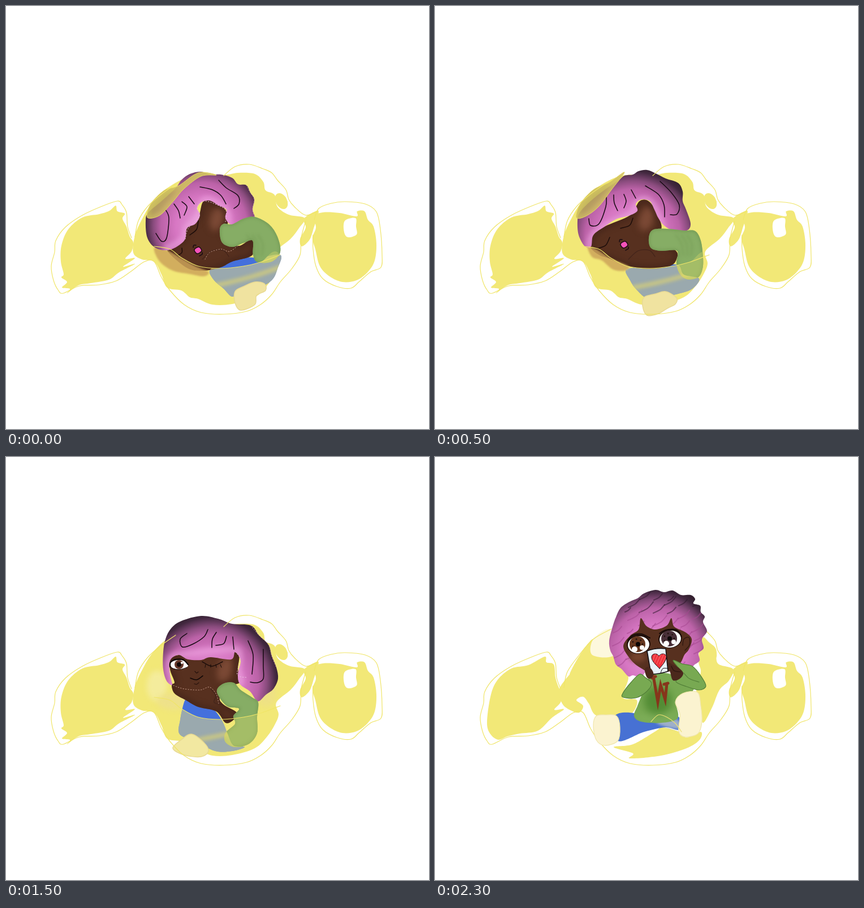
Recreate the animation shown at these times as an HTML page with a canvas. Size 748 by 748 pixels, loop 2.5 s.

```html
<!DOCTYPE html>
<html>
<head>
<meta charset="utf-8">
<style>
html, body { margin: 0; height: 100%; overflow: hidden; background: #fff }
canvas { display: block }
</style>
</head>
<body>
<canvas id="stage" width="748" height="748"></canvas>
<script>
const c = document.getElementById('stage').getContext('2d');
const YELLOW = '#f2e877', BROWN = '#57301f', CREAM = '#fbf3d0';

// Smooth path through "x,y x,y ..." points
function curve(text, closed = true) {
  const p = text.trim().split(/\s+/).map(s => s.split(',').map(Number));
  const n = p.length, path = new Path2D();
  const at = i => closed ? p[(i + n) % n] : p[Math.max(0, Math.min(n - 1, i))];
  path.moveTo(...p[0]);
  for (let i = 0; i < (closed ? n : n - 1); i++) {
    const [a, b, d, e] = [at(i - 1), at(i), at(i + 1), at(i + 2)];
    path.bezierCurveTo(b[0] + (d[0] - a[0]) / 6, b[1] + (d[1] - a[1]) / 6,
      d[0] - (e[0] - b[0]) / 6, d[1] - (e[1] - b[1]) / 6, ...d);
  }
  if (closed) path.closePath();
  return path;
}
function fill(shape, color) {
  c.fillStyle = color;
  c.fill(typeof shape === 'string' ? curve(shape) : shape);
}
function line(text, color = '#160a12', width = 1.5, closed = false) {
  c.strokeStyle = color;
  c.lineWidth = width;
  c.stroke(curve(text, closed));
}
function oval(x, y, rx, ry, color, turn = 0) {
  c.beginPath();
  c.ellipse(x, y, rx, ry, turn, 0, 7);
  c.fillStyle = color;
  c.fill();
}
function inside(shape, draw) {
  c.save();
  c.clip(curve(shape));
  draw();
  c.restore();
}
function soft(radius, draw) {
  c.save();
  c.filter = `blur(${radius}px)`;
  draw();
  c.restore();
}
function glow(x, y, r, stops) {
  const g = c.createRadialGradient(x, y, 0, x, y, r);
  stops.forEach(([at, color]) => g.addColorStop(at, color));
  return g;
}
const hairTone = (x, y, r) => glow(x, y, r, [[0, '#e6a0da'], [.45, '#d777c3'], [.68, '#bb62a7'], [.8, '#894b7d'], [.93, '#42283f'], [1, '#33202f']]);

const LEFT_WING = '98,424 110,395 135,374 165,368 183,362 194,353 197,363 210,367 206,376 213,390 219,408 225,418 222,434 211,447 228,446 207,461 228,456 200,471 182,484 150,490 128,494 108,508 113,500 99,498 108,488 98,480 102,474 97,452';
const LEFT_WING_FULL = '92,470 98,424 110,395 135,374 165,368 194,353 197,363 210,367 213,390 219,408 225,418 222,434 211,447 228,446 207,461 182,484 150,489 128,494 112,500 98,490';
const RIGHT_WING = '545,372 560,365 590,366 620,372 621,363 634,363 640,378 650,390 655,420 652,450 640,470 620,485 595,488 572,478 555,460 547,430 542,410 548,392';
const BODY = '228,406 240,378 258,348 285,322 330,300 385,299 410,295 440,297 455,311 459,326 475,334 480,355 500,369 528,375 518,393 503,412 478,434 482,455 476,472 462,494 440,515 400,527 365,528 340,518 325,515 310,503 285,498 275,475 262,452 240,448 225,436';
const FRONT = '262,425 290,430 310,445 340,460 380,464 420,460 450,453 485,440 530,560 390,580 240,560';

function wrapperBack(open) {
  fill(open ? LEFT_WING_FULL : LEFT_WING, YELLOW);
  fill(RIGHT_WING, YELLOW);
  fill('599,380 618,375 619,390 620,404 605,409 598,400', '#fff');
  fill('527,376 550,362 552,370 545,390 537,413 523,425 520,412 530,392', YELLOW);
  oval(487, 345, 10, 15, YELLOW, -.5);
  if (!open) return fill(BODY, YELLOW);
  fill('220,410 245,376 262,352 285,348 310,350 330,365 342,390 332,425 357,430 348,453 320,457 285,457 272,436 262,424 250,430 262,440 255,452 240,448 225,436', YELLOW);
  fill('238,385 255,352 279,322 279,348 260,362', YELLOW);
  fill('278,350 280,322 310,305 316,350', '#fdf8dd');
  fill('472,320 485,328 497,340 500,365 527,375 520,395 503,412 490,443 474,470 468,440 462,410 470,380 466,360', YELLOW);
  fill('316,513 350,508 390,485 402,478 432,486 445,496 470,486 468,500 445,515 400,528 345,533 350,524', YELLOW);
}
function wrapperLines(open) {
  const edge = (p) => line(p, '#f0e568', 1.2);
  edge('222,410 215,390 213,365 205,351 197,345 170,354 135,370 105,391 88,415 86,435 80,460 84,485 92,502 101,508 130,495 165,493 195,486 220,470 245,452 262,452 275,480 290,503 315,528 345,542 385,545 425,540 450,528 470,510 485,488 505,465 520,440 522,410 530,380');
  edge('545,378 553,358 575,349 600,346 635,350 655,364 662,395 665,440 663,462 645,470 625,487 610,499 585,496 560,482 548,460 543,430 543,405');
  edge('385,300 405,284 430,280 455,288 470,295 480,308 495,325 500,342 510,355 530,370 552,362');
  edge(open ? '228,408 234,380 255,350 280,322 312,304' : '228,408 234,380 250,355 272,335 300,315');
  if (!open) edge('262,425 290,430 310,445 340,460 380,464 420,460 450,453 485,440');
}

const CURLED = [
  {
    tone: [350, 388, 112],
    hair: '247,380 252,365 275,345 300,322 310,308 325,297 345,293 360,298 380,298 400,304 410,315 425,317 432,330 439,342 436,360 440,375 430,385 400,387 388,375 390,360 375,352 360,344 345,347 338,358 343,370 335,385 320,393 315,415 290,431 265,428 250,410',
    face: '285,432 300,422 316,410 320,393 340,373 348,347 362,344 388,360 392,385 385,400 410,424 435,412 436,440 400,452 380,462 350,468 320,463',
    chin: '262,428 285,432 310,446 335,460 358,470 350,478 325,474 295,468 272,452',
    green: '378,395 385,385 400,386 420,376 440,373 465,386 480,408 485,435 470,452 445,453 437,440 436,415 420,419 400,426 382,418',
    blue: '360,468 378,455 390,443 445,445 485,440 480,465 470,485 445,499 415,503 400,514 385,500 368,485',
    foot: '405,505 420,496 440,488 457,491 459,503 443,512 440,528 415,538 405,525',
    strands: ['282,360 288,375 284,410 275,416 265,402', '297,350 305,362 308,375', '311,346 320,355 315,370', '323,337 333,350', '343,320 365,325 380,335 389,350', '376,308 390,322 410,335 412,350 403,358'],
    lids: ['340,380 337,395 325,405', '311,428 311,436 304,441'],
    mouth: [339, 432], shade: '250,374 256,350 280,326 305,318 340,295 372,299 345,301 315,323 296,345 272,370', speckled: true
  },
  {
    tone: [350, 408, 124],
    hair: '252,380 256,365 275,345 300,325 325,308 335,300 350,298 360,292 375,290 390,296 408,305 430,313 438,328 438,345 444,360 452,385 445,397 420,396 405,388 395,375 388,360 380,345 365,342 355,350 358,362 345,370 320,377 300,390 280,405 276,425 265,425 254,405',
    face: '274,425 280,405 300,390 345,370 362,345 380,347 396,375 400,395 385,412 425,432 427,448 415,460 380,465 340,460 310,447 290,440',
    chin: '270,426 285,430 310,446 342,460 336,468 315,466 295,450 278,444',
    green: '378,411 385,396 410,394 440,397 460,398 470,415 474,445 473,465 465,480 445,483 432,472 427,455 428,433 400,433 382,428',
    blue: '338,466 368,462 380,453 400,458 430,458 440,475 467,482 455,500 430,509 400,515 375,517 355,500 345,485',
    foot: '367,530 370,515 390,509 408,505 427,516 425,527 412,534 395,544 375,547',
    strands: ['303,338 302,355 290,385 275,388 272,376', '316,334 317,348 323,362', '334,333 338,345 334,357', '347,325 355,340', '372,318 395,333 405,352 406,373', '398,310 418,330 432,352 428,368 416,369'],
    lids: ['350,375 344,388 328,393', '309,409 302,423 290,428'],
    mouth: [334, 422], shade: '250,374 257,350 280,325 308,312 335,294 312,325 289,355 266,372'
  },
  {
    tone: [360, 411, 124],
    hair: '259,385 260,360 280,338 300,318 318,303 345,302 360,294 380,292 405,299 415,310 435,318 443,337 454,345 453,368 460,385 450,397 430,402 410,405 400,393 396,365 390,348 375,343 363,351 368,362 350,370 325,377 300,391 284,405 283,430 272,427 262,405',
    face: '276,428 285,405 300,391 350,370 370,347 388,348 400,385 402,400 385,415 425,440 424,455 410,464 380,464 340,460 310,447 290,438',
    chin: '274,427 290,430 310,444 338,460 330,466 310,462 293,445',
    green: '378,420 388,401 415,404 450,402 464,425 470,460 464,488 440,494 424,480 427,455 430,438 395,440 382,432',
    blue: '333,462 360,463 375,456 400,462 425,466 432,485 467,486 455,505 425,515 385,515 355,511 340,495',
    foot: '352,536 357,516 380,510 408,516 415,527 403,540 385,542 370,549 355,546',
    strands: ['312,333 310,355 292,378 282,380 278,367', '328,330 326,345 332,357', '345,330 347,345 340,355', '358,324 366,340', '384,320 402,335 410,355 407,367', '418,333 438,350 435,375 422,381'],
    lids: ['357,374 348,386 330,391', '310,405 300,417 285,418'],
    mouth: [333, 420], shade: '251,372 260,347 280,326 302,309 326,303 306,333 285,358 266,372'
  },
  {
    tone: [363, 398, 123],
    hair: '278,375 278,345 282,322 292,303 310,290 345,281 375,286 400,295 433,298 447,315 464,332 470,352 478,372 481,392 473,410 460,420 445,432 432,415 414,402 410,385 415,360 405,345 398,358 362,354 345,359 322,358 305,350 290,360 290,385 294,403 284,396',
    face: '290,375 293,355 320,348 400,340 412,352 410,375 414,398 395,405 378,425 385,438 408,452 402,465 388,470 372,450 340,442 318,430 298,418 293,403 298,398',
    green: '373,416 382,402 402,399 415,412 435,425 446,434 444,460 444,488 430,507 405,513 388,504 388,488 405,472 402,458 412,445 390,440',
    blue: '316,431 325,430 345,443 365,445 382,466 392,490 402,510 422,513 400,520 370,520 335,503 307,490 308,465',
    foot: '295,515 310,500 328,490 350,505 358,520 345,530 315,527',
    strands: ['357,305 350,318 330,331 312,336 308,322 320,312', '372,310 365,322 364,337', '390,317 385,330 371,333', '401,318 403,340', '428,325 437,350 435,384', '455,340 455,370 455,392 445,399 432,398'],
    lids: ['347,362 364,370 383,362'], speckled: true, awake: true
  }
];

function curledGirl(p) {
  if (p.awake) soft(5, () => {
    oval(267, 405, 18, 27, '#f4ec9c');
    oval(297, 432, 30, 15, '#eee18a');
    oval(460, 420, 18, 22, '#eee184');
  });
  fill(p.blue, '#4470dc');
  fill(p.face, BROWN);
  inside(p.face, () => soft(6, () => {
    oval(p.tone[0] + 24, 376, 13, 22, '#7b4935', .3);
    line(p.face, '#3b1f17', 6, true);
  }));
  if (p.chin) soft(1.5, () => fill(p.chin, 'rgba(205,164,90,.85)'));
  soft(.6, () => fill(p.hair, hairTone(...p.tone)));
  inside(p.hair, () => soft(4, () => line(p.face, 'rgba(240,170,228,.55)', 13, true)));
  p.strands.forEach(s => line(s));
  p.lids.forEach(s => line(s, '#1c0d0a'));
  soft(.6, () => fill(p.green, '#86ad65'));
  inside(p.green, () => soft(2, () => {
    line(p.green, '#789e58', 5, true);
    c.save();
    c.translate(p.tone[0] + 76, 433);
    for (let i = 0; i < 3; i++) line(`${i * 10},-28 ${i * 9 + 10},-12 ${i * 7 + 13},8`, '#799f59', 2);
    c.restore();
  }));
  inside(FRONT, () => {
    fill(p.blue, 'rgba(240,226,130,.5)');
    fill(p.green, 'rgba(240,230,110,.28)');
  });
  inside(p.blue, () => soft(3, () => line('340,500 390,490 440,477 490,460', 'rgba(232,218,105,.65)', 7)));
  soft(.7, () => {
    fill(p.foot, p.awake ? '#f2e8a1' : '#f0e3a0');
    line(p.foot, '#e8d992', 1.5, true);
  });
  if (p.shade) {
    fill(p.shade, 'rgba(190,174,88,.82)');
    inside(p.shade, () => soft(5, () => line(p.shade, 'rgba(224,208,104,.7)', 7, true)));
    line(p.shade, '#e6d962', 1, true);
  }
  if (p.mouth) {
    const [x, y] = p.mouth;
    c.save();
    c.translate(x, y);
    fill('-6,-1 2,-6 7,1 -1,6', '#f553b8');
    line('-6,-1 2,-6 7,1 -1,6', '#180b12', 1.5, true);
    line('-8,-5 -7,-9 -3,-9');
    line('3,10 8,7 8,4');
    c.restore();
    line(`${x + 8},448 ${x + 25},433 ${x + 45},432 ${x + 55},443`, '#42231a', 1.2);
  }
  if (p.awake) {
    fill('290,365 300,359 314,360 322,369 312,375 296,374', '#fff');
    oval(306, 367, 8, 8, '#65382a');
    oval(306, 367, 4, 4, '#120908');
    oval(311, 364, 2, 2, '#fff');
    line('290,371 291,363 301,358 314,359 322,367', '#100807', 2.3);
    line('292,373 306,376 320,372', '#100807', 1);
    [353, 362, 371, 379].forEach((x, i) => line(`${x},367 ${x + i - 1},372`, '#100807', 1));
    line('334,379 337,382 340,380', '#25120d', 1.3);
    line('326,391 337,394 348,387', '#100807', 1.6);
    line('333,401 337,402 341,399', '#25120d', 1.2);
    line('362,410 371,422 368,434 383,438', '#40241b', 1.2);
  }
  if (p.speckled) {
    c.setLineDash([1.5, 3]);
    line(p.awake ? '296,404 315,410 343,412 360,407 372,420 376,436' : '352,448 360,436 380,430 395,434 410,424', '#c69b89', 1);
    line(p.awake ? '406,345 414,358 409,385 427,390' : '317,412 322,394 342,371 338,356 350,345 372,351 389,362 388,382', '#eec2e4', 1);
    line(p.awake ? '433,298 447,315 464,332 470,352 478,372' : '425,317 432,330 439,342 436,360 440,375', '#c893b7', 1);
    c.setLineDash([]);
  }
}

function bigEye(x, y, iris, turn) {
  oval(x, y, 21, 17, '#20100c', turn);
  oval(x, y + 1, 19, 15, '#fff', turn);
  oval(x - 2, y, 14, 14, iris);
  oval(x - 1, y, 4, 4, '#090505');
  for (let i = 0; i < 7; i++) oval(x - 2 + 9 * Math.cos(i * .9), y + 9 * Math.sin(i * .9), 1.4, 1.4, '#24140f');
  oval(x - 7, y + 9, 5, 5, '#fff');
  oval(x + 6, y + 6, 4, 4, '#fff');
}

function cardGirl() {
  const hair = '308,325 314,300 320,283 328,267 344,256 358,250 370,241 390,235 405,239 420,236 435,244 452,244 460,251 457,259 469,263 470,274 477,282 474,292 481,308 472,322 475,338 466,347 468,360 458,368 450,377 430,374 380,375 365,389 350,386 342,388 330,375 320,367 315,352 310,342';
  const torso = '375,395 390,382 420,385 440,402 457,408 452,417 431,425 426,435 429,462 400,470 365,468 352,458 358,440 366,420';
  fill('318,458 352,453 365,467 400,468 430,459 432,482 408,478 370,486 323,502', '#4771d3');
  soft(2, () => fill('392,468 428,464 431,480 405,476', '#9eafc9'));
  fill(hair, hairTone(389, 348, 119));
  inside(hair, () => {
    for (let i = 0; i < 48; i++) {
      const x = 312 + (i * 47 % 164), y = 250 + (i * 71 % 130), k = 10 + i % 4 * 5;
      line(`${x},${y} ${x + k * .6},${y - k * .3} ${x + k},${y - k * .75}`, y < 285 ? 'rgba(47,25,44,.55)' : 'rgba(166,72,145,.55)', 2);
    }
  });
  fill('333,335 345,316 360,305 364,285 374,299 390,305 410,298 418,285 423,300 443,310 454,322 449,340 441,350 434,364 418,378 385,382 362,372 346,358', BROWN);
  soft(4, () => oval(359, 354, 14, 8, '#78452f'));
  line('438,333 440,322 449,319 450,332 442,342', '#321a13');
  bigEye(360, 331, '#66371f', -.1);
  bigEye(416, 321, '#493039', -.15);
  line('341,324 350,315 365,313 380,320', '#170b09', 2);
  line('397,312 408,306 425,305 433,311', '#170b09', 2);
  line('389,338 391,340 394,337', '#2a140f', 1);
  fill(torso, '#78a952');
  inside(torso, () => soft(7, () => {
    oval(394, 431, 25, 25, '#538c35');
    line('360,462 395,466 425,458', '#81b25e', 8);
  }));
  const left = '362,384 372,390 383,400 374,415 355,426 333,425 332,418 347,398';
  const right = '421,360 438,366 455,370 470,387 479,405 467,412 445,406 426,397 437,383';
  [left, right].forEach(s => { fill(s, '#78a952'); line(s, '#527f38', 1.2, true); });
  line('440,382 450,392 467,398', '#527f38', 1.2);
  c.lineJoin = 'miter';
  c.strokeStyle = '#86351b';
  c.lineWidth = 5;
  c.stroke(new Path2D('M386 387L394 433L399 403L407 429L410 401M384 391L390 388M405 402L412 400'));
  c.lineJoin = 'round';
  const card = new Path2D('M375 343Q391 337 408 339L412 379Q397 384 382 384Z');
  fill(card, '#e9f2f7');
  c.strokeStyle = '#130f13';
  c.lineWidth = 1.6;
  c.stroke(card);
  const heart = new Path2D('M397 374C391 368 383 361 383 354C383 347 393 346 396 352C401 345 410 348 409 355C407 363 402 368 397 374Z');
  fill(heart, '#ef343d');
  c.lineWidth = 1;
  c.stroke(heart);
  c.save();
  c.clip(heart);
  for (let i = 0; i < 6; i++) line(`${382 + i * 5},366 ${390 + i * 5},348`, '#ff8585', .8);
  c.restore();
  line('399,382 403,374 413,374', '#130f13', 1);
  fill('371,376 378,371 386,381 383,391 375,390', '#4b281c');
  fill('412,364 420,367 430,372 439,382 433,392 421,395 416,381', '#4b281c');
  line('418,370 423,378 434,380', '#291410', 1.2);
  const shoes = ['280,475 285,458 302,456 321,458 327,478 323,502 300,510 285,500', '425,433 438,418 464,416 470,440 472,468 465,489 442,495 431,485 433,455'];
  shoes.forEach(s => { fill(s, CREAM); line(s, '#f0e6ab', 1.2, true); });
  line('382,468 395,456 410,460 425,471 436,486', '#eadf71', 1.2);
}

function draw(pose) {
  const open = pose === 4;
  c.fillStyle = '#fff';
  c.fillRect(0, 0, 748, 748);
  c.lineCap = c.lineJoin = 'round';
  wrapperBack(open);
  if (open) {
    wrapperLines(true);
    cardGirl();
  } else {
    curledGirl(CURLED[pose]);
    wrapperLines(false);
  }
}

let shown = -1;
function tick() {
  const pose = Math.floor(performance.now() % 2500 / 500);
  if (pose !== shown) draw(shown = pose);
  requestAnimationFrame(tick);
}
tick();
</script>
</body>
</html>
```
